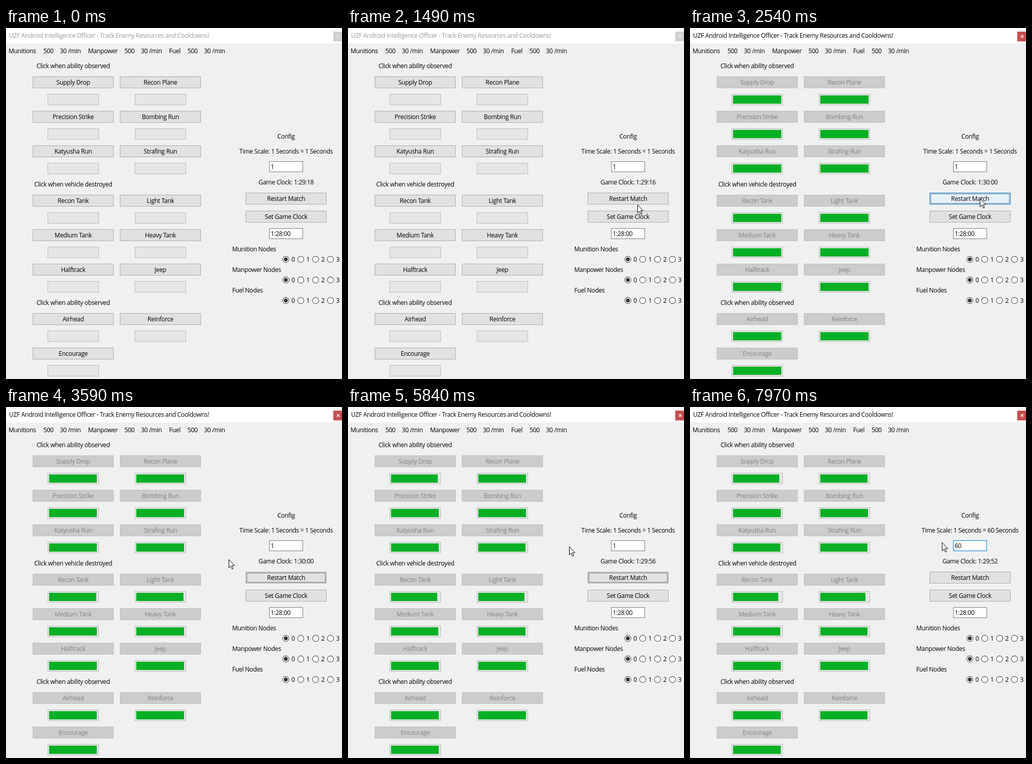
Write an HTML page with a canvas that moves like this. It is 655 px wide and 682 px high and loops after 8000 ms.

```html
<!DOCTYPE html>
<html lang="en">
<head>
<meta charset="utf-8">
<title>Intelligence Officer</title>
<style>
html, body { margin: 0; width: 100%; height: 100%; overflow: hidden; background: #eef1f0; }
canvas { display: block; }
</style>
</head>
<body>
<canvas id="stage" width="655" height="682"></canvas>
<script>
const ctx = document.getElementById('stage').getContext('2d');
const LOOP = 8000, RESTART = 2540, FOCUS_ENTRY = 6480;

// Left panel: row top, then [label, pixels lost per tick] for each column
const rows = [
  [94, ['Supply Drop', .75], ['Recon Plane', .25]],
  [161, ['Precision Strike', .1], ['Bombing Run', .1]],
  [228, ['Katyusha Run', .25], ['Strafing Run', .34]],
  [324, ['Recon Tank', 1], ['Light Tank', 1]],
  [391, ['Medium Tank', .34], ['Heavy Tank', .34]],
  [458, ['Halftrack', .1], ['Jeep', .1]],
  [554, ['Airhead', .1], ['Reinforce', .25]],
  [621, ['Encourage', .1]]
];
const ticks = [3450, 4420, 5360, 6350, 7310];
const clock = [[0, '1:29:18'], [530, '1:29:17'], [1480, '1:29:16'], [2470, '1:29:15'],
  [RESTART, '1:30:00'], [4420, '1:29:58'], [5360, '1:29:56'], [6350, '1:29:53'], [7310, '1:29:52']];
const typed = [[0, '1'], [7380, '6'], [7740, '60']];

// Pointer path: time, x, y
const path = [
  [330, 645, 662], [370, 645, 662], [860, 640, 326], [1070, 564, 362], [1390, 564, 362],
  [1490, 564, 343], [1710, 564, 330], [1860, 564, 330], [1870, 565, 331], [3390, 565, 331],
  [3590, 434, 296], [3860, 428, 279], [5825, 428, 279], [5840, 430, 271], [6040, 549, 280],
  [6180, 549, 280], [6400, 525, 268], [6540, 525, 267], [6660, 515, 266], [6850, 491, 263]
];

const between = (t, a, b) => t >= a && t < b;
const latest = (list, t) => list.filter(k => k[0] <= t).pop()[1];

function pointer(t) {
  if (!between(t, 330, 370) && t < 860) return { x: -99, y: -99 };
  const i = path.findIndex(k => k[0] > t);
  if (i < 0) return { x: 491, y: 263 };
  const [t0, x0, y0] = path[i - 1], [t1, x1, y1] = path[i];
  const p = (t - t0) / (t1 - t0);
  return { x: Math.round(x0 + (x1 - x0) * p), y: Math.round(y0 + (y1 - y0) * p) };
}

function fill(x, y, w, h, color) {
  ctx.fillStyle = color;
  ctx.fillRect(x, y, w, h);
}

function box(x, y, w, h, face, edge) {
  fill(x, y, w, h, edge);
  fill(x + 1, y + 1, w - 2, h - 2, face);
}

function text(s, x, y, align = 'left', color = '#000') {
  ctx.fillStyle = color;
  ctx.textAlign = align;
  ctx.fillText(s, x, y);
}

const looks = {
  normal: ['#e1e1e1', '#adadad', '#000'],
  hover: ['#e5f1fb', '#0078d7', '#000'],
  pressed: ['#cce4f7', '#005499', '#000'],
  disabled: ['#cccccc', '#bfbfbf', '#838383']
};

function button(label, x, y, look, focus) {
  const [face, edge, ink] = looks[look];
  box(x, y, 158, 23, face, edge);
  if (focus) {
    ctx.strokeStyle = '#000';
    ctx.lineWidth = 1;
    ctx.setLineDash([1, 1]);
    ctx.strokeRect(x + 2.5, y + 2.5, 153, 18);
    ctx.setLineDash([]);
  }
  text(label, x + 79, y + 16, 'center', ink);
}

function progress(x, y, width) {
  box(x, y, 100, 22, '#e6e6e6', '#bcbcbc');
  if (width) fill(x + 3, y + 3, width, 16, '#06b025');
}

function disc(x, y, r, color) {
  ctx.beginPath();
  ctx.arc(x, y, r, 0, 7);
  ctx.fillStyle = color;
  ctx.fill();
}

function radios(label, y) {
  text(label, 441, y - 16);
  for (let i = 0; i < 4; i++) {
    const x = 545.5 + i * 29;
    disc(x, y - .5, 6.5, '#333');
    disc(x, y - .5, 5.5, '#fff');
    if (!i) disc(x, y - .5, 3.7, '#2e313b');
    text(i, x + 11, y + 4);
  }
}

function titleBar(active) {
  fill(0, 0, 655, 30, '#fff');
  text('UZF Android Intelligence Officer - Track Enemy Resources and Cooldowns!',
    6, 19, 'left', active ? '#000' : '#999');
  fill(638, 7, 17, 19, active ? '#c75050' : '#d0d0d0');
  ctx.strokeStyle = active ? '#fff' : '#eee';
  ctx.lineWidth = 1.2;
  ctx.beginPath();
  ctx.moveTo(645, 14); ctx.lineTo(650, 19);
  ctx.moveTo(650, 14); ctx.lineTo(645, 19);
  ctx.stroke();
}

function arrow(x, y) {
  ctx.beginPath();
  for (const [dx, dy] of [[0, 0], [0, 16], [3.7, 12.5], [6.2, 18.3], [8.6, 17.3], [6.1, 11.5], [11, 11.5]])
    ctx.lineTo(x + dx + .5, y + dy + .5);
  ctx.closePath();
  ctx.fillStyle = '#fff';
  ctx.fill();
  ctx.strokeStyle = '#000';
  ctx.lineWidth = 1;
  ctx.stroke();
}

function beam(x, y) {
  fill(x, y - 7, 1, 15, '#000');
  for (const dy of [-8, 8]) {
    fill(x - 3, y + dy, 3, 1, '#000');
    fill(x + 1, y + dy, 3, 1, '#000');
  }
}

function leftPanel(t) {
  const live = t >= RESTART;
  const n = ticks.filter(k => k <= t).length;
  text('Click when ability observed', 131, 78, 'center');
  text('Click when vehicle destroyed', 131, 308, 'center');
  text('Click when ability observed', 131, 538, 'center');
  for (const [y, ...cells] of rows)
    cells.forEach(([label, rate], col) => {
      const x = 52 + col * 170;
      button(label, x, y, live ? 'disabled' : 'normal');
      progress(x + 29, y + 34, live && 94 - (n ? 1 + Math.floor(rate * n) : 0));
    });
}

function scaleEntry(t) {
  const focused = t >= FOCUS_ENTRY, selected = between(t, 6600, 7380);
  const value = latest(typed, t);
  box(513, 259, 66, 21, '#fff', focused ? '#0078d7' : '#7a7a7a');
  if (selected) fill(516, 262, 7, 15, '#0078d7');
  text(value, 516, 274, 'left', selected ? '#fff' : '#000');
  if (between(t, FOCUS_ENTRY, 7080) || between(t, 7380, 7970))
    fill(t < 7380 ? 516 : 516 + 6 * value.length, 262, 1, 15, '#000');
}

function config(t, { x, y }) {
  const over = top => x >= 467 && x < 625 && y >= top && y < top + 23;
  const look = top => over(top) ? 'hover' : 'normal';
  text('Config', 546, 215, 'center');
  text(`Time Scale: 1 Seconds = ${t < 7810 ? 1 : 60} Seconds`, 546, 244, 'center');
  scaleEntry(t);
  text('Game Clock: ' + latest(clock, t), 546, 304, 'center');
  button('Restart Match', 467, 320, between(t, 2400, RESTART) ? 'pressed' : look(320),
    between(t, 2400, FOCUS_ENTRY));
  button('Set Game Clock', 467, 355, look(355));
  box(513, 389, 66, 21, '#fff', '#7a7a7a');
  text('1:28:00', 516, 404);
  radios('Munition Nodes', 450);
  radios('Manpower Nodes', 490);
  radios('Fuel Nodes', 530);
}

function draw(t) {
  const p = pointer(t);
  ctx.font = '12px "Open Sans", "Noto Sans", sans-serif';
  ctx.letterSpacing = '-0.3px';
  fill(0, 0, 655, 682, '#eef1f0');
  titleBar(t >= 2400);
  [['Munitions', 5, 73], ['Manpower', 160, 231], ['Fuel', 318, 354]].forEach(([name, x, amount]) => {
    text(name, x, 49);
    text('500', amount, 49);
    text('30 /min', amount + 32, 49);
  });
  leftPanel(t);
  config(t, p);

  const dragging = between(t, FOCUS_ENTRY, 6820);
  if (dragging || between(t, 2400, RESTART)) disc(p.x, p.y, 12, 'rgba(255,228,30,.6)');
  const inEntry = p.x >= 513 && p.x < 579 && p.y >= 259 && p.y < 280;
  if (dragging || inEntry) beam(p.x, p.y);
  else arrow(p.x, p.y);
}

function frame() {
  draw(performance.now() % LOOP);
  requestAnimationFrame(frame);
}
frame();
</script>
</body>
</html>
```
